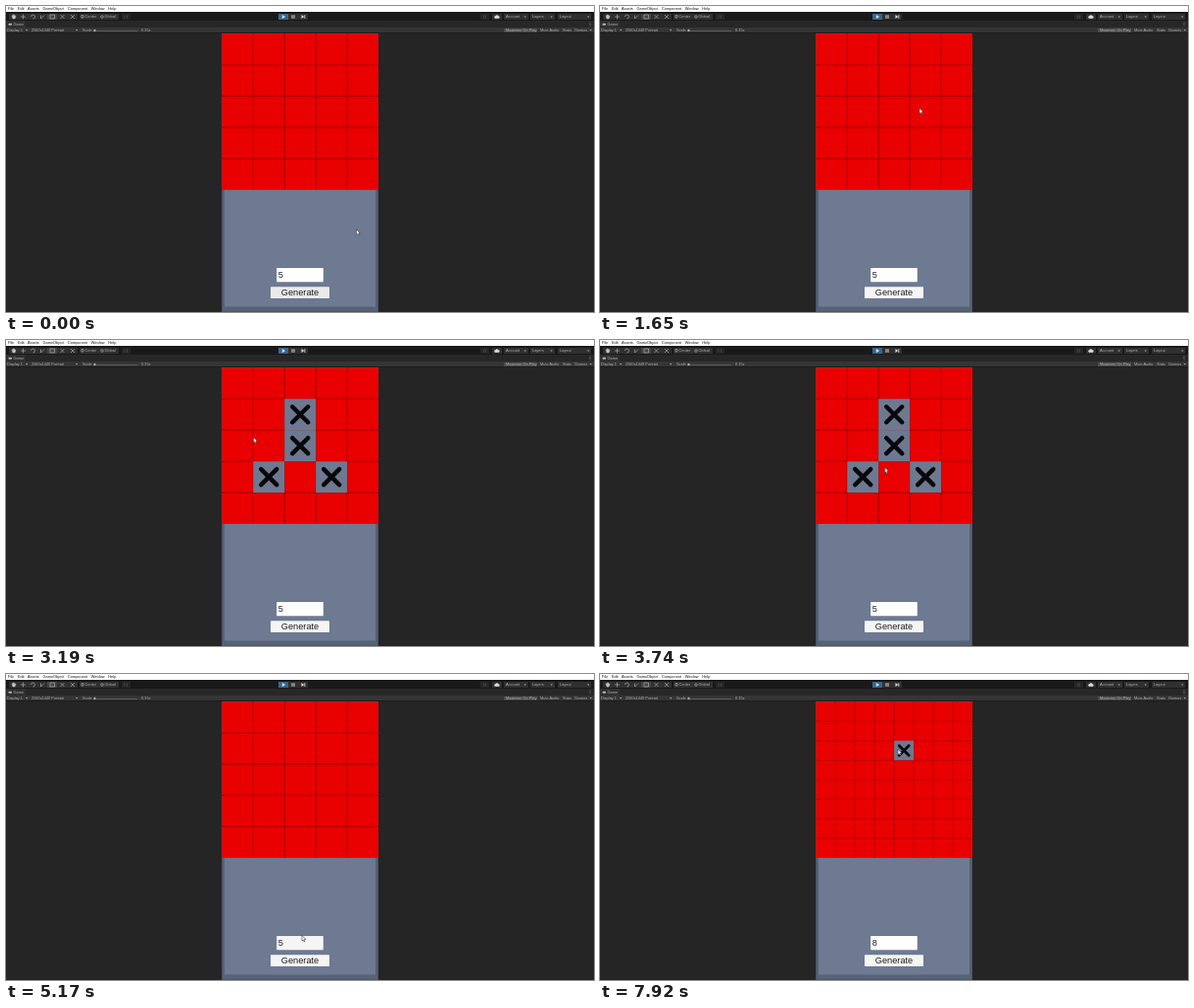
An HTML page that plays this animation: 600 px wide and 313 px high, repeating every 8000 ms.

```html
<!DOCTYPE html>
<html lang="en">
<head>
<meta charset="utf-8">
<title>Tile grid</title>
<style>
  html, body { margin: 0; width: 100%; height: 100%; overflow: hidden; background: #252525; }
  svg { display: block; width: 600px; height: 313px; }
  text { font-family: "Liberation Sans", Arial, sans-serif; font-size: 3.9px; fill: #b4b4b4; }
  .menu { fill: #111; word-spacing: 2.6px; }
  .big { font-size: 9.2px; fill: #1c1c1c; }
  .bars { shape-rendering: crispEdges; }
  .icon { fill: none; stroke: #a8a8a8; stroke-width: .7; }
</style>
</head>
<body>
<svg viewBox="0 0 600 313">
  <g class="bars">
    <rect width="600" height="313" fill="#252525"/>
    <rect width="600" height="6" fill="#fff"/>
    <rect y="6" width="600" height="9" fill="#191919"/>
    <rect y="15" width="600" height="7" fill="#272727"/>
    <rect y="15" width="20" height="7" fill="#303030"/>
    <rect y="22" width="600" height="5" fill="#353535"/>
    <rect y="27" width="600" height="1" fill="#1c1c1c"/>
    <path d="M3 8h70v6H3zM75 8h40v6H75zM288 8h20v6h-20zM496 8h10v6h-10zM508 8h25v6h-25zM535 8h25v6h-25zM563 8h34v6h-34z" fill="#303030"/>
    <rect x="42" y="8" width="10" height="6" fill="#444"/>
    <rect x="118" y="8" width="9" height="6" fill="#262626"/>
    <rect x="278" y="8" width="10" height="6" fill="#36668f"/>
    <rect x="484" y="8" width="9" height="6" fill="#262626"/>
    <rect x="508" y="23" width="34" height="4" fill="#4c4c4c"/>
    <rect x="89" y="25" width="45" height="1" fill="#5a5a5a"/>
  </g>

  <g class="icon">
    <path d="M6 10l1 3h2l1-3zM7 10v-1h1.500v1" fill="#ccc"/>
    <path d="M15 11h5M17.500 8.500v5M25.500 11a2 2 0 1 1 2 2M35.500 13v-3.500M35.500 13l3.500-3.500"/>
    <path d="M45 9h4.500v4H45zM55.500 9l4 4M55.500 13l4-4M66 9l4 4M66 13l4-4M77 9.500h2v2.500h-2z"/>
    <circle cx="98" cy="11" r="1.300"/>
    <path d="M121 9.500v3M123.500 9.500v3" stroke="#555"/>
    <circle cx="488.500" cy="11" r="1.300" stroke="#505050"/>
    <path d="M596 16.500v4" stroke-dasharray=".9 .7"/>
  </g>
  <path d="M281.800 9l3.400 2-3.400 2zM291.500 9.200h1v3.600h-1zM293.500 9.200h1v3.600h-1zM301.500 9l2.700 2-2.700 2zM304.400 9.200h.9v3.600h-.9z" fill="#ddd"/>
  <path d="M499 12.700a1.300 1.300 0 0 1 .4-2.500a1.700 1.700 0 0 1 3.100 0a1.300 1.300 0 0 1 .4 2.500z" fill="#ddd"/>
  <path d="M20 24h2.400l-1.200 1.600zM71 24h2.400l-1.200 1.600zM528.500 10.500h2.400l-1.200 1.500zM555.500 10.500h2.400l-1.200 1.500zM593 10.500h2.400l-1.200 1.500zM595.500 24h2.400l-1.200 1.500z" fill="#aaa"/>
  <circle cx="90.500" cy="25" r="1.200" fill="#aaa"/>
  <rect x="2.500" y="17.800" width="3.500" height="2" rx=".8" fill="#b4b4b4"/>

  <text class="menu" x="2" y="4.300">File Edit Assets GameObject Component Window Help</text>
  <text x="80.500" y="12.400">Center</text>
  <text x="100.500" y="12.400">Global</text>
  <text x="510" y="12.400">Account</text>
  <text x="537" y="12.400">Layers</text>
  <text x="565" y="12.400">Layout</text>
  <text x="7.500" y="20.200">Game</text>
  <text x="1" y="26.200">Display 1</text>
  <text x="26" y="26.200">2560x1440 Portrait</text>
  <text x="78" y="26.200">Scale</text>
  <text x="138" y="26.200">0.35x</text>
  <text x="510" y="26.200">Maximize On Play</text>
  <text x="545" y="26.200">Mute Audio</text>
  <text x="568" y="26.200">Stats</text>
  <text x="580" y="26.200">Gizmos</text>

  <rect x="220.300" y="28" width="159.500" height="285" fill="#566275"/>
  <rect x="223" y="188" width="154" height="119.500" fill="#6e7a92"/>
  <rect x="220.300" y="312" width="159.500" height="1" fill="#4a5878"/>
  <g id="grid"></g>

  <rect id="field" x="276.200" y="268" width="47.600" height="14.200" rx=".6"/>
  <text id="count" class="big" x="277.800" y="277.600"></text>
  <rect id="button" x="270" y="287.200" width="60" height="11.700" rx=".6"/>
  <text class="big" x="300" y="296.300" text-anchor="middle">Generate</text>
  <path id="cursor" d="M0 0V5.400L1.200 4.400L2 6.200L3 5.800L2.200 4H3.900Z" fill="#fff" stroke="#222" stroke-width=".5"/>
</svg>
<script>
const $ = id => document.getElementById(id);
const LOOP = 8000, STEP = 110, REBUILD = 7040;
const LEFT = 220.3, TOP = 28.3, SIDE = 159.8;

// Pointer stops: time, x, y
const path = [
  [0, 357.5, 228.5], [660, 297, 71], [990, 297, 70], [1650, 326, 104.5],
  [2200, 302, 76], [2530, 300, 106], [2860, 331, 138], [3080, 266, 136],
  [3190, 252.5, 99.5], [3960, 300, 138], [4290, 300.5, 101.5], [5170, 302, 267.5],
  [6490, 302, 267.5], [6820, 300.5, 287], [7370, 300.5, 287], [7810, 304, 77],
  [LOOP, 304, 77]
];
const clicks = [2200, 2530, 2860, 3080, 3960, 7810];

function pointer(t) {
  const i = path.findIndex(p => p[0] > t);
  const [t0, x0, y0] = path[i - 1], [t1, x1, y1] = path[i];
  const k = (t - t0) / (t1 - t0), e = k * k * (3 - 2 * k);
  return [x0 + (x1 - x0) * e, y0 + (y1 - y0) * e];
}

const touches = (a, b) => Math.abs(a[0] - b[0]) + Math.abs(a[1] - b[1]) === 1;

// Each click marks the cell under the pointer; three or more joined marks vanish.
function marksAt(t, cell) {
  let marks = [];
  for (const c of clicks) {
    if (c > t || (t >= REBUILD && c < REBUILD)) continue;
    const [x, y] = pointer(c);
    const group = [[Math.floor((x - LEFT) / cell), Math.floor((y - TOP) / cell)]];
    marks.push(group[0]);
    for (const g of group)
      group.push(...marks.filter(m => touches(m, g) && !group.includes(m)));
    if (group.length >= 3) marks = marks.filter(m => !group.includes(m));
  }
  return marks;
}

const rect = (x, y, size, fill) =>
  `<rect x="${x}" y="${y}" width="${size}" height="${size}" fill="${fill}"/>`;

function cross([col, row], cell) {
  const x = LEFT + col * cell, y = TOP + row * cell, d = cell / 2;
  return rect(x, y, cell, "#6c7991") +
    `<path d="M${x + d / 2} ${y + d / 2}l${d} ${d}m${-d} 0l${d} ${-d}" stroke="#080808" ` +
    `stroke-width="${cell * .14}" stroke-linecap="round"/>`;
}

function gridMarkup(t) {
  const n = t < REBUILD ? 5 : 8, cell = SIDE / n;
  let lines = "";
  for (let i = 1; i < n; i++)
    lines += `M${LEFT + i * cell} ${TOP}v${SIDE}M${LEFT} ${TOP + i * cell}h${SIDE}`;
  return rect(LEFT, TOP, SIDE, "#e90000") +
    `<path d="${lines}" stroke="#b00000" stroke-width="${n > 5 ? .8 : 1.2}"/>` +
    marksAt(t, cell).map(m => cross(m, cell)).join("");
}

function buttonColor(t) {
  if (t < 1100) return "#ebebeb";
  return t >= 6820 && t < REBUILD ? "#c8c8c8" : "#f5f5f5";
}

function draw(t) {
  $("grid").innerHTML = gridMarkup(t);
  $("count").textContent = t < 6380 ? 5 : 8;
  $("field").setAttribute("fill", t >= 5060 && t < 6600 ? "#f5f5f5" : "#fff");
  $("button").setAttribute("fill", buttonColor(t));
  $("cursor").setAttribute("transform", `translate(${pointer(t)})`);
}

const start = performance.now();
let shown = -1;
function tick() {
  const t = (performance.now() - start) % LOOP;
  const step = Math.floor(t / STEP) * STEP;
  if (step !== shown) draw(shown = step);
  requestAnimationFrame(tick);
}
tick();
</script>
</body>
</html>
```
